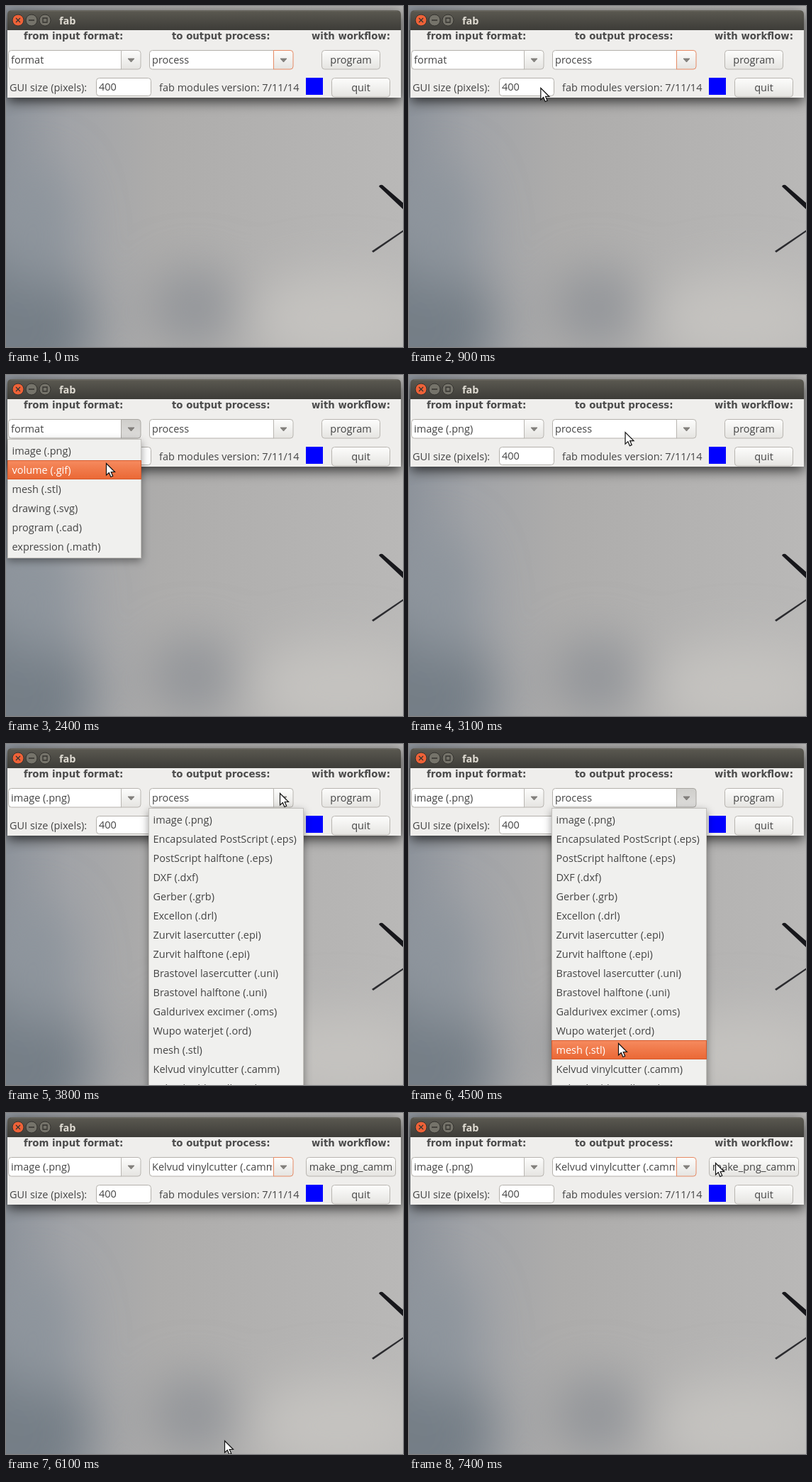
These frames come from a looping animation (560x480 px, 7.5 s). An HTML page:

```html
<!DOCTYPE html>
<html lang="en">
<head>
<meta charset="utf-8">
<title>fab</title>
<style>
  html, body { margin: 0; width: 100%; height: 100%; overflow: hidden; }
  svg { display: block; }
  text { font: 14.5px "Open Sans", "Noto Sans", sans-serif; fill: #444; }
  .head text { font: bold 13.33px "DejaVu Sans", sans-serif; fill: #4c4c4c; }
  .mid { text-anchor: middle; }
  .window { filter: drop-shadow(0 5px 9px rgba(0, 0, 0, .75)); }
  .menu { filter: drop-shadow(0 4px 6px rgba(0, 0, 0, .4)); }
  .field { fill: #fff; stroke: #b3b0ab; }
  .button { fill: url(#raised); stroke: #b8b5b0; }
  .pressed { fill: url(#sunken); stroke: #aaa7a2; }
  .focus { stroke: #e58a64; }
  .arrow { fill: #85837f; stroke: #6d6b67; stroke-width: .7; }
  .menu .active { fill: #fff; }
</style>
</head>
<body>
<svg id="stage" width="560" height="480" viewBox="0 0 560 480">
  <defs>
    <linearGradient id="sky">
      <stop offset="0" stop-color="#8d939b"/><stop offset=".16" stop-color="#a1a3a7"/>
      <stop offset=".38" stop-color="#adacab"/><stop offset="1" stop-color="#b9b8b7"/>
    </linearGradient>
    <linearGradient id="bar" x2="0" y2="1">
      <stop stop-color="#5b5951"/><stop offset="1" stop-color="#3d3c38"/>
    </linearGradient>
    <linearGradient id="raised" x2="0" y2="1">
      <stop stop-color="#fdfdfc"/><stop offset="1" stop-color="#e5e4e1"/>
    </linearGradient>
    <linearGradient id="sunken" x2="0" y2="1">
      <stop stop-color="#cfcecb"/><stop offset="1" stop-color="#dedddb"/>
    </linearGradient>
    <linearGradient id="hot" x2="0" y2="1">
      <stop stop-color="#f68a5e"/><stop offset="1" stop-color="#ea6835"/>
    </linearGradient>
    <filter id="soft" x="-100%" y="-100%" width="300%" height="300%">
      <feGaussianBlur stdDeviation="35"/>
    </filter>
  </defs>

  <rect width="560" height="480" fill="url(#sky)"/>
  <g filter="url(#soft)">
    <ellipse cx="10" cy="450" rx="110" ry="110" fill="#747e86"/>
    <ellipse cx="40" cy="310" rx="55" ry="90" fill="#8d949c"/>
    <ellipse cx="265" cy="425" rx="65" ry="55" fill="#929499"/>
    <ellipse cx="470" cy="440" rx="130" ry="65" fill="#c5c3c0"/>
  </g>
  <path d="M526 254Q527 251 531 252L560 277V286Z" fill="#17171b"/>
  <path d="M516 345L560 315.500V318L518 347Z" fill="#2b2b2f"/>

  <g class="window">
    <path d="M2 34V12Q2 6 8 6H551Q557 6 557 12V34Z" fill="url(#bar)"/>
    <rect x="2" y="34" width="555" height="95" fill="#efeeec"/>
  </g>
  <path d="M7 7H552" stroke="#6f6d65"/>
  <g stroke="#34332f">
    <circle cx="17" cy="20" r="8" fill="#ee6238"/>
    <circle cx="36" cy="20" r="8" fill="#75736a"/>
    <circle cx="55" cy="20" r="8" fill="#75736a"/>
    <path d="M14 17l6 6m0-6l-6 6M32 20h8M52 17h6v6h-6z" fill="none" stroke-width="1.300"/>
  </g>
  <text x="75" y="25.500" style="font-weight:bold;fill:#dfdbd2">fab</text>

  <g class="head">
    <text x="25" y="47">from input format:</text>
    <text x="234" y="47">to output process:</text>
    <text x="431" y="47">with workflow:</text>
  </g>

  <path class="field" d="M163 62.500H7.500Q3.500 62.500 3.500 66.500V85Q3.500 89 7.500 89H163Z"/>
  <path class="field" d="M378 62.500H206.500Q202.500 62.500 202.500 66.500V85Q202.500 89 206.500 89H378Z"/>
  <path id="inputButton" d="M162.500 62.500H186Q190 62.500 190 66.500V85Q190 89 186 89H162.500Z"/>
  <path id="outputButton" d="M377.500 62.500H401Q405 62.500 405 66.500V85Q405 89 401 89H377.500Z"/>
  <path class="arrow" d="M172 74h9l-4.500 5zM387 74h9l-4.500 5z"/>
  <text id="input" x="7" y="81"></text>
  <svg width="375" height="480"><text id="output" x="206" y="81"></text></svg>
  <rect id="runButton" class="button" y="62.500" height="26.500" rx="4"/>
  <text id="run" class="mid" x="486.500" y="81"></text>

  <text x="5" y="120">GUI size (pixels):</text>
  <rect class="field" x="127.500" y="101.500" width="77" height="25" rx="4"/>
  <text x="131" y="119">400</text>
  <text x="216" y="120">fab modules version: 7/11/14</text>
  <rect x="423" y="101" width="24" height="24" fill="#00f"/>
  <rect class="button" x="459.500" y="101.500" width="82" height="26.500" rx="4"/>
  <text class="mid" x="500.500" y="120">quit</text>

  <g id="menus"></g>
  <path id="cursor" d="M.5 .5V17L4.300 13.500L6.900 19.500L9.700 18.300L7.200 12.500H12.500Z" fill="#fff" stroke="#111" stroke-width="1.200"/>
</svg>
<script>
const LOOP = 7500, STEP = 100, ROW = 27, TOP = 93;
const $ = id => document.getElementById(id);

function add(parent, tag, attrs, text = '') {
  const node = document.createElementNS('http://www.w3.org/2000/svg', tag);
  for (const key in attrs) node.setAttribute(key, attrs[key]);
  node.textContent = text;
  return parent.appendChild(node);
}

function makeMenu(x, width, opens, closes, items) {
  const group = add($('menus'), 'g', { class: 'menu' });
  add(group, 'rect', { x: x + .5, y: 90.5, width: width - 1, height: items.length * ROW + 5,
    fill: '#f0f0ee', stroke: '#c3c1bd' });
  const bar = add(group, 'rect', { x: x + .5, width: width - 1, height: ROW - 1,
    fill: 'url(#hot)', stroke: '#d5592c' });
  const rows = items.map((item, i) => add(group, 'text', { x: x + 6.5, y: TOP + 19 + i * ROW }, item));
  return (t, y) => {
    const row = Math.floor((y - TOP) / ROW);
    group.style.display = t >= opens && t < closes ? '' : 'none';
    bar.style.display = row >= 0 ? '' : 'none';
    bar.setAttribute('y', TOP + .5 + row * ROW);
    rows.forEach((node, i) => node.classList.toggle('active', i === row));
  };
}

const menus = [
  makeMenu(2, 189, 1200, 2800, ['image (.png)', 'volume (.gif)', 'mesh (.stl)',
    'drawing (.svg)', 'program (.cad)', 'expression (.math)']),
  makeMenu(201, 219, 3700, 6000, ['image (.png)', 'Encapsulated PostScript (.eps)',
    'PostScript halftone (.eps)', 'DXF (.dxf)', 'Gerber (.grb)', 'Excellon (.drl)',
    'Zurvit lasercutter (.epi)', 'Zurvit halftone (.epi)', 'Brastovel lasercutter (.uni)',
    'Brastovel halftone (.uni)', 'Galdurivex excimer (.oms)', 'Wupo waterjet (.ord)',
    'mesh (.stl)', 'Kelvud vinylcutter (.camm)', 'Kelvud table mill (.rml)'])
];

// Pointer stops: time, x, y
const path = [
  [200, 300, 490], [800, 190, 130], [1100, 172, 72], [1300, 172, 72], [1600, 153, 105],
  [2000, 146, 160], [2100, 146, 160], [2400, 141, 124], [2700, 140, 108], [2800, 140, 108],
  [3200, 335, 75], [3500, 386, 69], [3900, 386, 69], [4500, 295, 421], [4800, 300, 452],
  [5500, 300, 452], [5800, 308, 461], [6100, 308, 461], [6700, 320, 436], [7300, 432, 70],
  [7500, 432, 70]
];

function pointerAt(t) {
  const i = Math.max(1, path.findIndex(stop => stop[0] > t));
  const [t0, x0, y0] = path[i - 1], [t1, x1, y1] = path[i];
  const k = Math.max(0, (t - t0) / (t1 - t0)), ease = k * k * (3 - 2 * k);
  return [x0 + (x1 - x0) * ease, y0 + (y1 - y0) * ease];
}

function draw(t) {
  const [x, y] = pointerAt(t), done = t >= 6000;
  $('cursor').setAttribute('transform', `translate(${x} ${y})`);
  $('cursor').style.display = t < path[0][0] ? 'none' : '';
  menus.forEach(update => update(t, y));

  $('input').textContent = t < 2800 ? 'format' : 'image (.png)';
  $('output').textContent = done ? 'Kelvud vinylcutter (.camm)' : 'process';
  $('run').textContent = done ? 'make_png_camm' : 'program';
  $('runButton').setAttribute('x', done ? 423.5 : 445.5);
  $('runButton').setAttribute('width', done ? 126 : 82);

  $('inputButton').setAttribute('class', t >= 1200 && t < 2800 ? 'pressed' : 'button');
  $('outputButton').setAttribute('class',
    t < 1200 || done ? 'button focus' : t >= 3900 ? 'pressed' : 'button');
}

function tick() {
  draw(Math.floor(performance.now() % LOOP / STEP) * STEP);
  requestAnimationFrame(tick);
}
tick();
</script>
</body>
</html>
```
